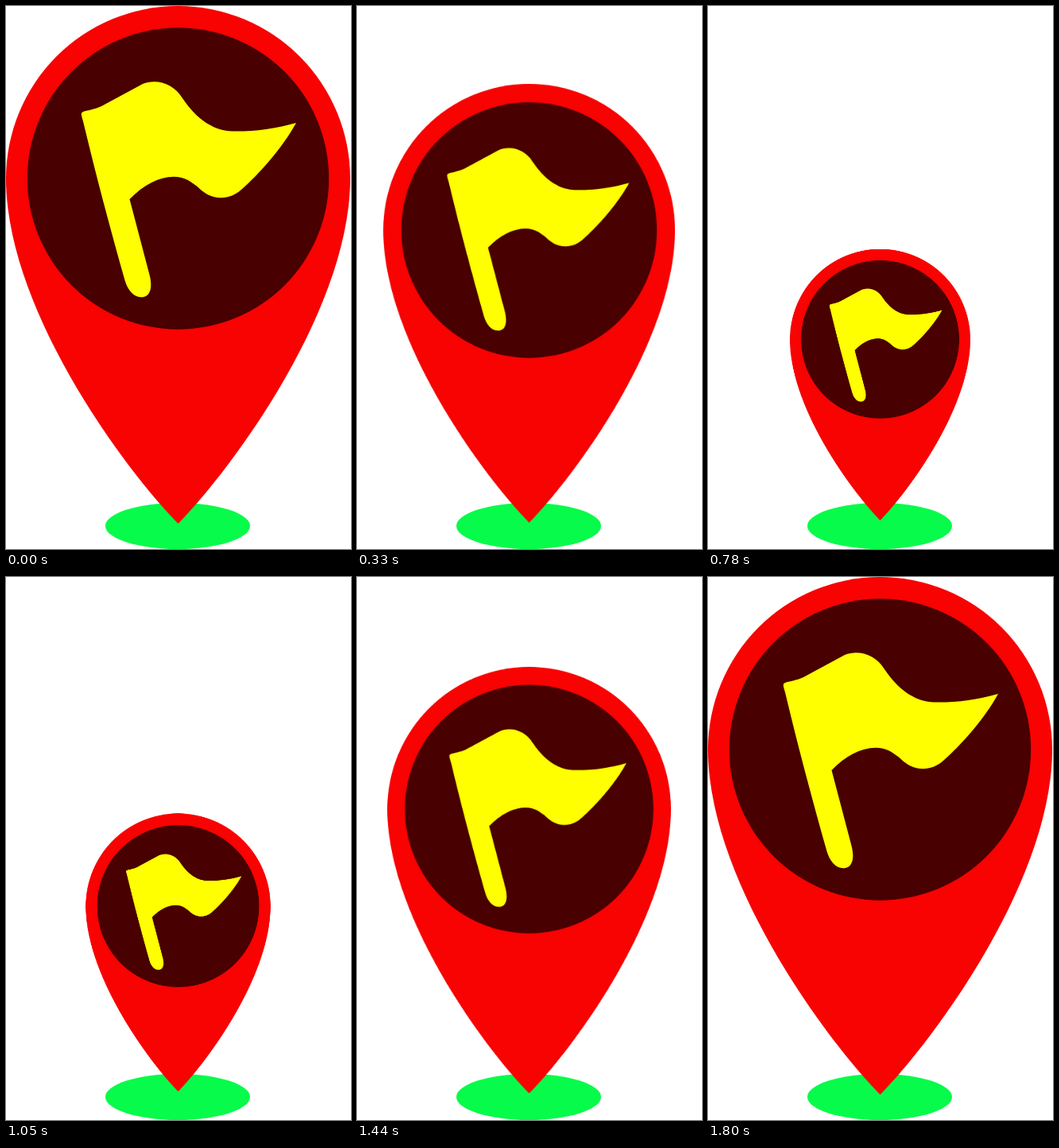
Animation of 434x683 px, one loop 1.83 s. Source, as an HTML page:

```html
<!DOCTYPE html>
<html lang="en">
<head>
<meta charset="utf-8">
<title>Map pin</title>
<style>
  html, body { margin: 0; width: 100%; height: 100%; overflow: hidden; background: #fff; }
  svg { display: block; width: 434px; height: 683px; }
  #pin { transform-origin: 216.5px 642.4px; }
</style>
</head>
<body>
<svg viewBox="0 0 434 683">
  <ellipse cx="216" cy="654" rx="91" ry="29" fill="#07fb4a"/>
  <g id="pin">
    <path fill="#f80202" d="M0 217A216.5 217 0 0 1 433 217C433 383 281 586 216.5 651C152 586 0 383 0 217Z"/>
    <circle cx="216.5" cy="217" r="189.7" fill="#480000"/>
    <path fill="#ff0" d="M95 135C96 131 109 132 122 125L172 98
      C190 91 211 98 222 116C240 143 262 157 284 157.5
      C312 158 337 155 365 147C348 178 318 212 296 231
      C281 244 262 245 246 232C239 225 229 218 221 216
      C200 211 176 222 155.5 243L181 340
      C184 353 182 364 173 366C161 368 153 357 149.5 345
      C131 280 112 208 97 145C95 139 94.500 136 95 135Z"/>
  </g>
</svg>
<script>
  const STEP = 30, COUNT = 61, HALF = 30;
  const smooth = x => x * x * (3 - 2 * x);

  // Shrink to half size and grow back, held for STEP ms per pose.
  const poses = Array.from({ length: COUNT + 1 }, (_, i) => {
    const k = Math.min(i, COUNT - 1);
    const x = 1 - Math.abs(k - HALF) / HALF;
    return {
      offset: i / COUNT,
      transform: `scale(${1 - smooth(x) / 2})`,
      easing: 'steps(1, end)'
    };
  });

  document.getElementById('pin').animate(poses, {
    duration: STEP * COUNT,
    iterations: Infinity
  });
</script>
</body>
</html>
```
